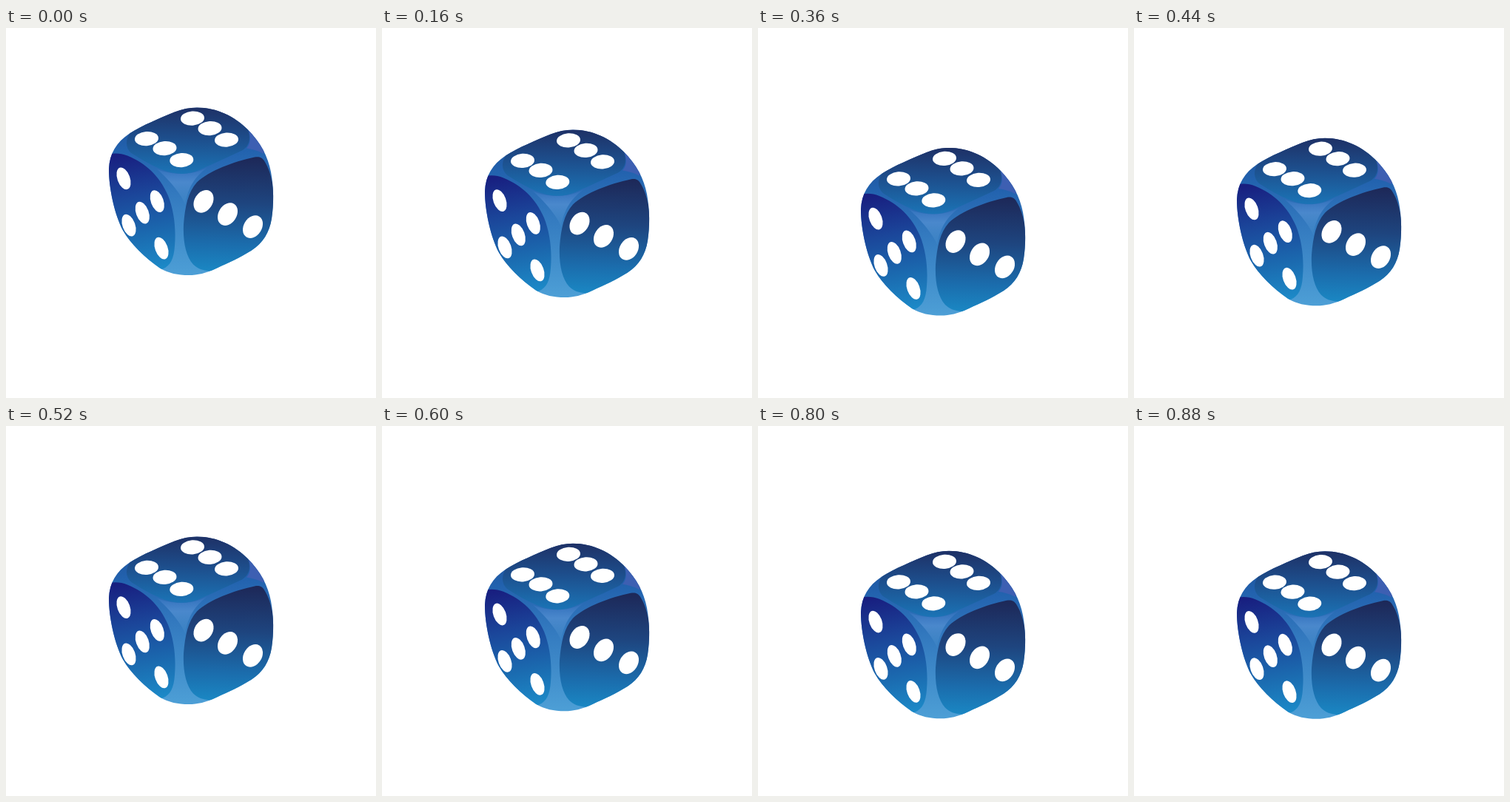
An HTML page that plays this animation: 500x500 px, repeating every 1280 ms.

```html
<!DOCTYPE html>
<html lang="en">
<head>
<meta charset="utf-8">
<title>Bouncing die</title>
<style>
html, body { margin: 0; width: 100%; height: 100%; overflow: hidden; background: #fff; }
svg { display: block; width: 100vw; height: 100vh; }
</style>
</head>
<body>
<svg viewBox="0 0 500 500">
  <defs>
    <linearGradient id="rim" x1="0" y1="0" x2="0" y2="1">
      <stop offset="0" stop-color="#1c4a92"/>
      <stop offset=".25" stop-color="#2262ae"/>
      <stop offset=".5" stop-color="#3278be"/>
      <stop offset="1" stop-color="#4d9fd6"/>
    </linearGradient>
    <linearGradient id="top" x1=".45" y1="0" x2=".42" y2="1">
      <stop offset="0" stop-color="#1e2c60"/>
      <stop offset=".5" stop-color="#1d4e8c"/>
      <stop offset="1" stop-color="#1b74b6"/>
    </linearGradient>
    <linearGradient id="left" x1=".4" y1="0" x2=".5" y2="1">
      <stop offset="0" stop-color="#181f80"/>
      <stop offset=".35" stop-color="#1b469a"/>
      <stop offset=".7" stop-color="#1b6bb0"/>
      <stop offset="1" stop-color="#1c8ac8"/>
    </linearGradient>
    <linearGradient id="right" x1=".52" y1="0" x2=".5" y2="1">
      <stop offset="0" stop-color="#1d2858"/>
      <stop offset=".4" stop-color="#1e457f"/>
      <stop offset=".75" stop-color="#1b6cac"/>
      <stop offset="1" stop-color="#1a88c4"/>
    </linearGradient>
    <linearGradient id="shine" x1="0" y1="0" x2="0" y2="1">
      <stop offset="0" stop-color="#4a80cc" stop-opacity=".2"/>
      <stop offset=".4" stop-color="#4a88cc"/>
      <stop offset="1" stop-color="#4a90cc" stop-opacity=".2"/>
    </linearGradient>
    <path id="body" d="M258 107C285 107 309 119 327 137C344 154 354 173 358 194C362 216 362 238 359 257C356 276 347 290 332 300C316 310 300 317 285 324C270 331 259 333.5 247 333.5C232 333.5 220 331 208 324C188 310 168 291 158 273C147 252 139 217 139 190C140 169 149 154 167 142C184 131 209 121 228 113C238 109 248 107 258 107Z"/>
    <clipPath id="clip"><use href="#body"/></clipPath>
  </defs>
  <g id="die">
    <use href="#body" fill="url(#rim)"/>
    <g clip-path="url(#clip)">
      <path fill="#3d5fb2" d="M327 136C331 146 331 156 325 162C332 163 340 165 347 169L352 166Z"/>
      <path fill="url(#shine)" d="M204 190C222 198 250 200 272 188C256 200 246 214 242 238C238 226 222 206 204 190Z"/>
      <path fill="url(#top)" d="M168 141C161 150 161 162 170 169C184 178 200 187 214 192C231 198 246 198 262 191C282 182 304 172 319 165C329 159 331 149 327 137L300 100H220Z"/>
      <path fill="url(#left)" d="M130 174C142 167 153 168 164 172C189 182 208 200 219 226C227 246 230 270 228 294C227 311 222 321 212 325L190 330L130 260Z"/>
      <path fill="url(#right)" d="M362 222C360 203 355 188 349 179C346 174 342 173 336 174C308 180 275 192 258 208C246 221 242 240 240 265C239 288 243 308 253 319C259 325 266 327 275 328L300 330L370 290Z"/>
    </g>
    <g id="pips" fill="#fff"></g>
  </g>
</svg>
<script>
const LOOP = 1280, STEP = 40;
const die = document.getElementById('die');

function addPips(rx, ry, angle, centers) {
  for (const [x, y] of centers) {
    const pip = document.createElementNS('http://www.w3.org/2000/svg', 'ellipse');
    pip.setAttribute('rx', rx);
    pip.setAttribute('ry', ry);
    pip.setAttribute('transform', `translate(${x} ${y}) rotate(${angle})`);
    document.getElementById('pips').append(pip);
  }
}
addPips(16, 9.6, -4, [[252, 121.5], [275.5, 135], [298, 150.5], [190, 149], [214.5, 162], [237.3, 178]]);
addPips(8.5, 15.5, -20, [[159, 202.7], [204.3, 233.5], [184.3, 249], [166, 266], [210, 297]]);
addPips(12.2, 16.4, 32, [[267, 233.7], [299.5, 251], [333.5, 268]]);

// Cubic Bezier easing, solved by bisection
function bezier(x1, y1, x2, y2) {
  const at = (s, a, b) => 3 * s * (1 - s) * ((1 - s) * a + s * b) + s ** 3;
  return t => {
    let lo = 0, hi = 1;
    for (let i = 0; i < 24; i++) {
      const mid = (lo + hi) / 2;
      if (at(mid, x1, x2) < t) lo = mid; else hi = mid;
    }
    return at(lo, y1, y2);
  };
}

const ease = bezier(.25, .1, .25, 1);
const fall = bezier(.36, .1, .36, 1);
const TOP = .6, REST = 62.2, APEX = 40.6;
const moves = [
  [67, 320, TOP, REST, fall],
  [325, 485, REST, APEX, ease],
  [485, 865, APEX, REST, ease]
];

function drop(t) {
  let y = TOP;
  for (const [start, end, from, to, curve] of moves) {
    if (t >= end) y = to;
    else if (t > start) y = from + (to - from) * curve((t - start) / (end - start));
  }
  return y;
}

function draw(now) {
  const t = Math.floor(now % LOOP / STEP) * STEP;
  die.setAttribute('transform', `translate(0 ${drop(t).toFixed(2)})`);
  requestAnimationFrame(draw);
}
requestAnimationFrame(draw);
</script>
</body>
</html>
```
